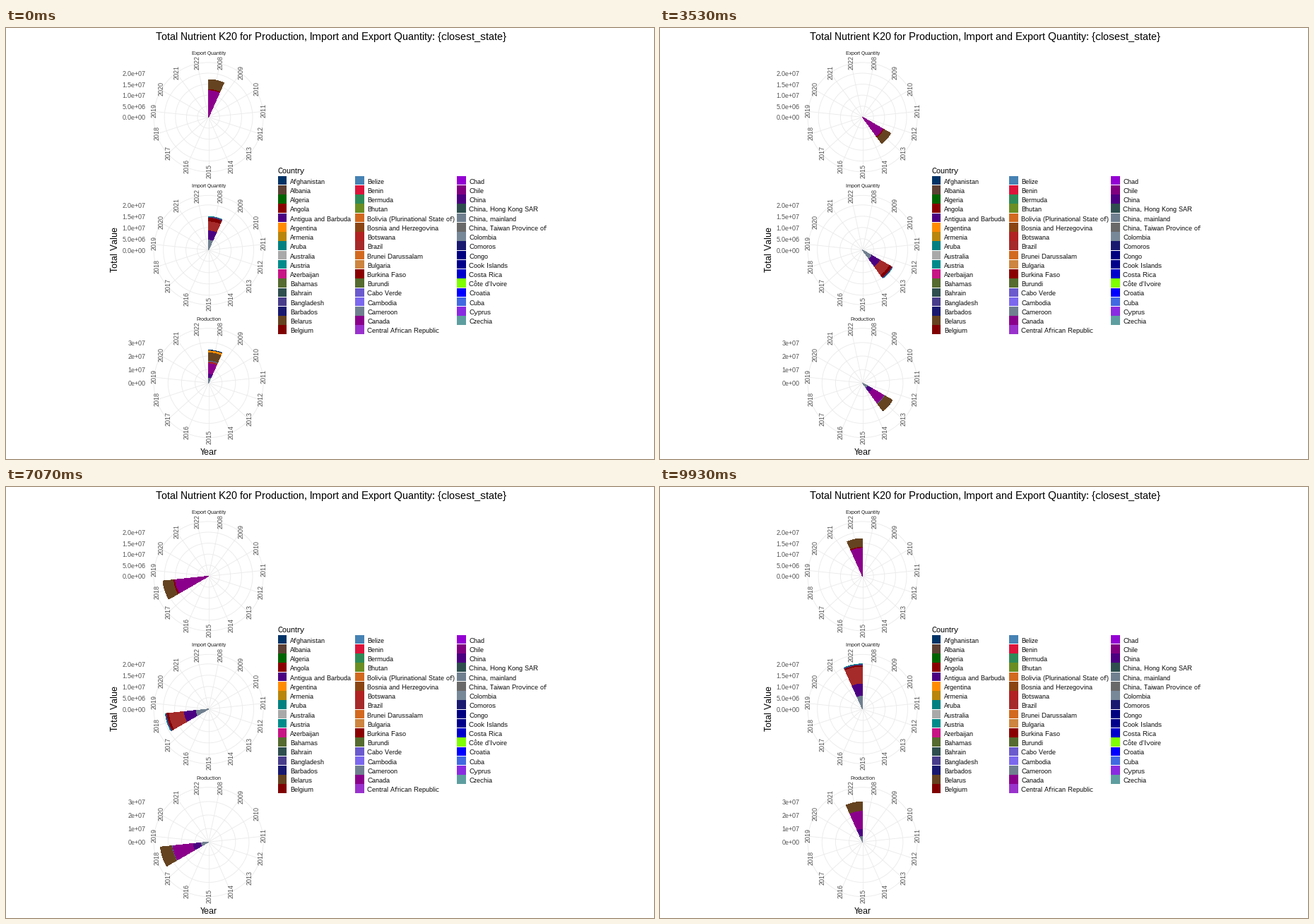
Write a matplotlib script that moves like this. It is 917 px wide and 611 px high and loops after 10000 ms.

```python
import matplotlib.pyplot as plt
import numpy as np
from matplotlib.animation import FuncAnimation
from matplotlib.patches import Circle, Rectangle, Wedge

W, H, DPI = 917, 611, 100
PX = 72 / DPI
FRAMES, INTERVAL = 200, 50
TICKS = 150
YEARS = np.arange(2008, 2023)
LAST = len(YEARS) - 1
STEP = 360 / len(YEARS)
CX, RIM = 286.6, 77.5
GRID, TICK_TEXT, STRIP = "#ebebeb", "#4d4d4d", "#1a1a1a"

# Whole-pixel hinting keeps the small labels crisp.
plt.rcParams.update({"font.family": "Liberation Sans",
                     "text.hinting": "no_autohint",
                     "text.hinting_factor": 1})

COUNTRIES = {
    "Afghanistan": "#003366", "Albania": "#5c4033", "Algeria": "darkgreen",
    "Angola": "darkred", "Antigua and Barbuda": "indigo",
    "Argentina": "darkorange", "Armenia": "darkgoldenrod", "Aruba": "teal",
    "Australia": "darkgray", "Austria": "darkcyan",
    "Azerbaijan": "mediumvioletred", "Bahamas": "darkolivegreen",
    "Bahrain": "darkslategray", "Bangladesh": "darkslateblue",
    "Barbados": "midnightblue", "Belarus": "#654321", "Belgium": "maroon",
    "Belize": "steelblue", "Benin": "crimson", "Bermuda": "seagreen",
    "Bhutan": "olivedrab", "Bolivia (Plurinational State of)": "chocolate",
    "Bosnia and Herzegovina": "saddlebrown", "Botswana": "firebrick",
    "Brazil": "brown", "Brunei Darussalam": "chocolate", "Bulgaria": "peru",
    "Burkina Faso": "darkred", "Burundi": "darkolivegreen",
    "Cabo Verde": "slateblue", "Cambodia": "mediumslateblue",
    "Cameroon": "slategray", "Canada": "darkmagenta",
    "Central African Republic": "darkorchid", "Chad": "darkviolet",
    "Chile": "purple", "China": "indigo",
    "China, Hong Kong SAR": "darkslategray", "China, mainland": "slategray",
    "China, Taiwan Province of": "dimgray", "Colombia": "lightslategray",
    "Comoros": "midnightblue", "Congo": "navy", "Cook Islands": "darkblue",
    "Costa Rica": "mediumblue", "Côte d'Ivoire": "chartreuse",
    "Croatia": "blue", "Cuba": "royalblue", "Cyprus": "blueviolet",
    "Czechia": "cadetblue",
}

fig = plt.figure(figsize=(W / DPI, H / DPI), dpi=DPI, facecolor="white")
ax = fig.add_axes([0, 0, 1, 1])
ax.set(xlim=(0, W), ylim=(H, 0))
ax.axis("off")


def label(x, y, text, size, color="black", ha="left", va="baseline", **kw):
    ax.text(x, y, text, fontsize=size * PX, color=color, ha=ha, va=va, **kw)


class Rose:
    """One polar panel with a single stacked sector."""

    # Totals (million tonnes) are set at these years, linear in between.
    KEY_YEARS = [2008, 2009, 2011, 2013, 2014, 2016, 2018, 2020, 2022]

    def __init__(self, row, title, px_per_mt, ticks, totals, stack):
        self.cy = 126.4 + 188.4 * row
        self.totals = px_per_mt * np.interp(YEARS, self.KEY_YEARS, totals)
        # First and last share of each layer; a negative end dies out midway.
        self.first, self.last = np.array(list(stack.values())).T
        self.draw_grid(title, px_per_mt, ticks)
        count = len(stack)
        self.wedges = [
            ax.add_patch(Wedge((CX, self.cy), 1, 0, STEP, fc=COUNTRIES[name],
                               lw=0, antialiased=False, zorder=3 + count - k))
            for k, name in enumerate(stack)]

    def draw_grid(self, title, px_per_mt, ticks):
        label(CX, self.cy - 88.6, title, 7.4, STRIP, "center")
        for text in ticks:
            r = float(text) / 1e6 * px_per_mt
            label(197.3, self.cy - r + 4, text, 9.33, TICK_TEXT, "right")
            self.ring(r)
        self.ring(RIM)
        for k, year in enumerate(YEARS):
            a = np.radians((k + .5) * STEP)
            x, y = CX + RIM * np.sin(a), self.cy - RIM * np.cos(a)
            ax.plot([CX, x], [self.cy, y], color=GRID, lw=.9 * PX)
            label(x + 1, y - 1.2, str(year), 9.33, TICK_TEXT, "center",
                  "center", rotation=90)

    def ring(self, r):
        ax.add_patch(Circle((CX, self.cy), r, fill=False, ec=GRID,
                            lw=.9 * PX))

    def show(self, state):
        mix = self.first + (self.last - self.first) * state / LAST
        radii = np.cumsum(np.clip(mix, 0, None))
        radii *= self.totals[state] / radii[-1]
        start = state * STEP - 90
        for wedge, r in zip(self.wedges, radii):
            wedge.set_radius(r)
            wedge.set_theta1(start)
            wedge.set_theta2(start + STEP)


def draw_legend():
    label(384.3, 206, "Country", 11.1)
    columns, rows, pitch, size = [384.6, 494.2, 638], 17, 13.23, 12.6
    for n, (name, color) in enumerate(COUNTRIES.items()):
        col, row = divmod(n, rows)
        x, y = columns[col], 209.8 + row * pitch
        ax.add_patch(Rectangle((x, y), size, size, fc=color, lw=0,
                               antialiased=False))
        label(x + 17.2, y + 10.9, name, 9.35)


label(460.5, 17.2, "Total Nutrient K20 for Production, Import and Export "
      "Quantity: {closest_state}", 15.2, ha="center")
label(155, 313.5, "Total Value", 12.6, ha="center", va="center", rotation=90)
label(CX, 605, "Year", 12, ha="center")
draw_legend()

TRADE_TICKS = ["0.0e+00", "5.0e+06", "1.0e+07", "1.5e+07", "2.0e+07"]
ROSES = [
    Rose(0, "Export Quantity", 3.12, TRADE_TICKS,
         [17.1, 10.9, 16.1, 14.7, 18, 15.8, 20.8, 20.7, 17.1],
         {"Chile": (.06, .06), "Canada": (.65, .68), "Belgium": (.03, .03),
          "Belarus": (.27, .23)}),
    Rose(1, "Import Quantity", 3.2, TRADE_TICKS,
         [14.8, 9.4, 15.4, 15.3, 18, 15.1, 19.2, 21.5, 20],
         {"China, mainland": (.29, .28), "China": (.27, .27),
          "Brazil": (.27, .37), "Belgium": (.11, .03),
          "Bangladesh": (.03, .02), "Austria": (.015, .015)}),
    Rose(2, "Production", 1.91, ["0e+00", "1e+07", "2e+07", "3e+07"],
         [24.4, 20.7, 30.5, 25.5, 30.2, 33.9, 35.8, 30.6, 29.8],
         {"China, mainland": (.16, .14), "China": (.12, .18),
          "Canada": (.34, .45), "Brazil": (.06, -.2), "Belize": (.02, 0),
          "Belarus": (.27, .24), "Argentina": (.06, -.1),
          "Afghanistan": (.03, -.05)}),
]


def update(frame):
    # Years jump on a clock of TICKS per loop, spread evenly over it.
    tick = int((frame + .7) * TICKS / FRAMES)
    state = int((tick + .49) * LAST / (TICKS - 1))
    for rose in ROSES:
        rose.show(state)
    return [w for rose in ROSES for w in rose.wedges]


anim = FuncAnimation(fig, update, frames=FRAMES, interval=INTERVAL,
                     repeat=True, repeat_delay=0, blit=False)
plt.show()
```
